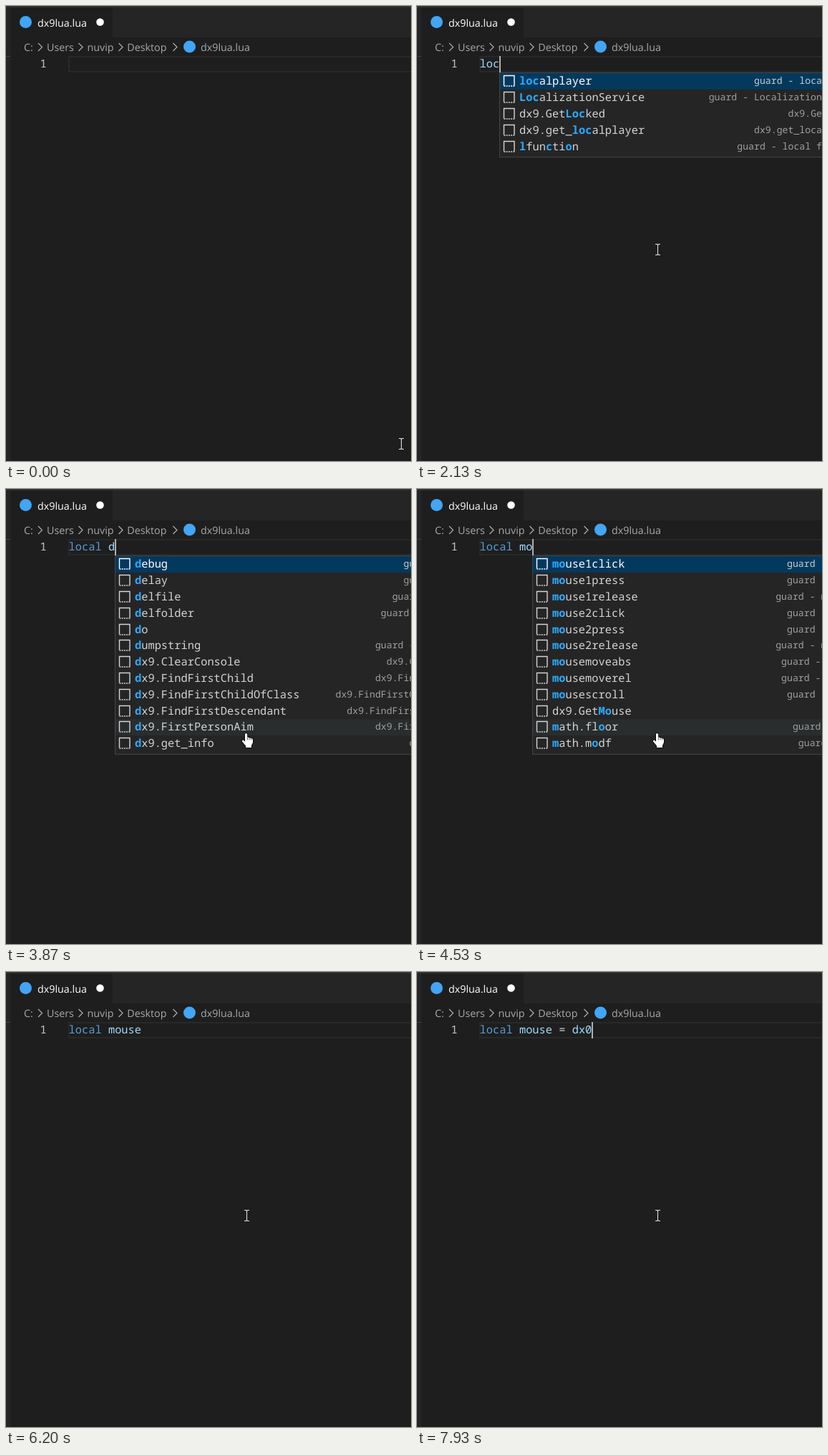
These frames come from a looping animation (566x637 px, 8 s). An HTML page with a canvas:

```html
<!DOCTYPE html>
<html lang="en">
<head>
<meta charset="utf-8">
<title>Code completion</title>
<style>
  html, body { margin: 0; width: 100%; height: 100%; overflow: hidden; background: #1e1e1e; }
  canvas { display: block; }
</style>
</head>
<body>
<canvas id="stage" width="566" height="637"></canvas>
<script>
const ctx = document.getElementById('stage').getContext('2d');
const LOOP = 8000, CHAR = 9.22, DETAIL_CHAR = 7.92, ROW = 22.82;
const MONO = '"Noto Sans Mono", "DejaVu Sans Mono", monospace';
const CODE = `500 15.37px ${MONO}`, BOLD = `bold 15.37px ${MONO}`, DETAIL = `13.2px ${MONO}`;
const UI = '14.3px "Open Sans", "Noto Sans", sans-serif';

const words = text => text.split(' ');
const dxItems = words('ClearConsole FindFirstChild FindFirstChildOfClass FindFirstDescendant FirstPersonAim ' +
  'get_info get_localplayer get_player get_players GetAdornee GetAllParts GetBoolValue').map(name => 'dx9.' + name);
const mouseItems = words('mouse1click mouse1press mouse1release mouse2click mouse2press mouse2release ' +
  'mousemoveabs mousemoverel mousescroll');
const localItems = words('localplayer LocalizationService dx9.get_localplayer');

// Brackets mark matched letters where the match is not one plain run.
const completions = {
  l: words('lfunction loadfile loadstring localplayer LocalizationService Lighting ' +
    'dx9.get_localplayer dx9.GetLocked delay delfile delfolder dx9.ClearConsole'),
  lo: words('loadfile loadstring localplayer LocalizationService dx9.GetLocked dx9.get_localplayer [l]functi[o]n'),
  loc: words('localplayer LocalizationService dx9.GetLocked dx9.get_localplayer [l]fun[c]ti[o]n'),
  loca: localItems,
  local: localItems,
  d: [...words('debug delay delfile delfolder do dumpstring'), ...dxItems.slice(0, 6)],
  dx: dxItems,
  m: ['math', ...mouseItems, 'dx9.GetMouse', 'dumpstring'],
  mo: [...mouseItems, 'dx9.GetMouse', '[m]ath.fl[o]or', '[m]ath.m[o]df'],
  mou: [...mouseItems, 'dx9.GetMouse', ':SetAttribute()', ':GetPropertyChangedSignal()'],
  moua: words('[mou]se1rele[a]se [mou]se2rele[a]se [mou]semove[a]bs'),
  mouae: words('[mou]se1rele[a]s[e] [mou]se2rele[a]s[e]')
};
completions.mous = completions.mouse =
  [...mouseItems, ':[S]etAttribute()', 'dx9.GetMouse', ':GetPropertyChanged[S]ignal()'];

// [start in ms, typed text, what shows: '' caret, 'list' caret and completions, 'off' hidden caret]
const states = [
  [0, '', 'off'], [530, '', ''], [1070, '', 'off'], [1530, '', ''],
  [1800, 'l', ''], [1865, 'l', 'list'], [1930, 'lo', ''], [2000, 'lo', 'list'], [2130, 'loc', 'list'],
  [2265, 'loca', 'list'], [2330, 'local', 'list'], [2465, 'local ', ''],
  [2800, 'local d', ''], [2865, 'local d', 'list'], [3000, 'local dx', 'list'], [3130, 'local dx0', ''],
  [3665, 'local dx', ''], [3730, 'local dx', 'list'], [3865, 'local d', 'list'], [4000, 'local ', ''],
  [4330, 'local m', 'list'], [4530, 'local mo', 'list'], [4730, 'local mou', 'list'],
  [4800, 'local mouae', 'list'], [5000, 'local mouae ', ''], [5130, 'local mouae', ''],
  [5265, 'local moua', 'list'], [5400, 'local mou', 'list'], [5465, 'local mous', 'list'],
  [5665, 'local mouse', 'list'], [5730, 'local mouse ', ''], [6200, 'local mouse ', 'off'],
  [6600, 'local mouse =', ''], [6665, 'local mouse = ', ''],
  [7130, 'local mouse = d', 'list'], [7530, 'local mouse = dx', 'list'], [7930, 'local mouse = dx0', '']
];

function rect(x, y, w, h, color) {
  ctx.fillStyle = color;
  ctx.fillRect(x, y, w, h);
}

function text(str, x, y, font, color) {
  ctx.font = font;
  ctx.fillStyle = color;
  ctx.fillText(str, x, y);
}

function disc(x, y, r, color) {
  ctx.fillStyle = color;
  ctx.beginPath();
  ctx.arc(x, y, r, 0, 7);
  ctx.fill();
}

function line(points, color, width = 1, dash = []) {
  ctx.strokeStyle = color;
  ctx.lineWidth = width;
  ctx.setLineDash(dash);
  ctx.beginPath();
  points.forEach(([x, y]) => ctx.lineTo(x, y));
  ctx.stroke();
  ctx.setLineDash([]);
}

function drawWindow() {
  rect(0, 0, 566, 637, '#1e1e1e');
  rect(0, 0, 6, 637, '#252526');
  rect(0, 70, 6, 1, '#444444');
  rect(149, 2, 417, 42, '#252526');
  rect(0, 0, 566, 2, '#333333');

  disc(27.5, 22.5, 8.5, '#42a5f5');
  text('dx9lua.lua', 44, 28.5, UI, '#ffffff');
  disc(131.5, 22.5, 5.3, '#ffffff');

  const crumbs = [['C:', 25], ['Users', 57], ['nuvip', 113.5], ['Desktop', 169.3], ['dx9lua.lua', 272]];
  crumbs.forEach(([name, x]) => text(name, x, 62.7, UI, '#a9a9a9'));
  [45, 101.5, 157.5, 233.5].forEach(x => line([[x, 52], [x + 5.5, 57.5], [x, 63]], '#a9a9a9', 1.3));
  disc(256.5, 57, 8.5, '#42a5f5');

  ctx.strokeStyle = '#282828';
  ctx.lineWidth = 2;
  ctx.strokeRect(88, 71, 500, 21);
  text('1', 47.5, 86, CODE, '#c6c6c6');
}

function drawCode(typed) {
  let column = 0;
  for (const token of typed.split(/( )/)) {
    const color = token === 'local' ? '#569cd6' : token === '=' ? '#d4d4d4' : '#9cdcfe';
    text(token, 87.6 + column * CHAR, 86, CODE, color);
    column += token.length;
  }
}

function splitMatches(item, query) {
  if (item.includes('[')) return item.split(/[\[\]]/);
  const at = item.toLowerCase().indexOf(query);
  if (at < 0) return [item];
  const end = at + query.length;
  return [item.slice(0, at), item.slice(at, end), item.slice(end)];
}

function drawItem(item, query, left, top, selected) {
  const labelX = left + 28, iconX = left + 6.5, iconY = top + 3.5;
  const color = selected ? '#ffffff' : '#d4d4d4';
  line([[iconX, iconY + 14], [iconX, iconY], [iconX + 14.5, iconY], [iconX + 14.5, iconY + 14]], color, 1.4);
  line([[iconX, iconY + 14.5], [iconX + 15, iconY + 14.5]], color, 1.4, [2, 1.2]);

  let column = 0;
  splitMatches(item, query).forEach((part, i) => {
    text(part, labelX + column * CHAR, top + 16, i % 2 ? BOLD : CODE, i % 2 ? '#2aaaff' : color);
    column += part.length;
  });

  const name = item.replace(/[\[\]:]/g, '');
  const detail = name.startsWith('dx9.') ? name : 'guard - ' + (name === 'lfunction' ? 'local function' : name);
  const detailX = Math.max(left + 506.5 - detail.length * DETAIL_CHAR, labelX + column * CHAR + 16.5);
  text(detail, detailX, top + 15, DETAIL, selected ? '#c5ccd2' : '#9f9f9f');
}

function drawCompletions(items, query, left) {
  const height = items.length * ROW + 5;
  rect(left, 93, 600, height, '#454545');
  rect(left + 1, 94, 600, height - 2, '#252526');
  rect(left + 1, 94, 600, ROW, '#04395e');
  if (items.length === 12) rect(left + 1, 94 + 10 * ROW, 600, ROW, '#2a2d2e');
  items.forEach((item, i) => drawItem(item, query, left, Math.round(94.25 + i * ROW), i === 0));
}

function drawBeam(x, y) {
  const strokes = [
    [[x, y - 7], [x, y + 7]],
    [[x - 3.5, y - 7.5], [x - 1, y - 7.5], [x, y - 6.5], [x + 1, y - 7.5], [x + 3.5, y - 7.5]],
    [[x - 3.5, y + 7.5], [x - 1, y + 7.5], [x, y + 6.5], [x + 1, y + 7.5], [x + 3.5, y + 7.5]]
  ];
  strokes.forEach(points => line(points, '#e0e0e0', 1.1));
}

const handShape = new Path2D('M5 2Q6.5 0 8.2 2V6.5L14.5 8Q16 8.6 16 10.5V14L14 18V21H6V18.5L1 12.5Q.5 10 2.8 10.5L5 12.8Z');

function drawHand(x, y) {
  ctx.save();
  ctx.translate(x, y);
  ctx.strokeStyle = '#000000';
  ctx.lineWidth = 1.6;
  ctx.stroke(handShape);
  ctx.fillStyle = '#ffffff';
  ctx.fill(handShape);
  [8.4, 11, 13.6].forEach(knuckle => line([[knuckle, 7], [knuckle, 10.5]], '#333333', 0.8));
  ctx.restore();
}

function drawPointer(t, overList) {
  if (overList) return drawHand(329, 341);
  const p = Math.min(1, Math.floor((t + 4) / 66.67) / 5);
  const ease = p * p * (3 - 2 * p);
  drawBeam(Math.round(552 - 216 * ease) + 0.5, Math.round(613 - 272 * ease));
}

function draw(now) {
  const t = now % LOOP;
  const [, typed, shown] = states.findLast(([start]) => start <= t);
  const caretX = Math.floor(87.6 + typed.length * CHAR);
  const query = typed.split(' ').pop();
  const items = shown === 'list' ? completions[query] : [];

  ctx.textRendering = 'geometricPrecision';
  drawWindow();
  drawCode(typed);
  if (shown !== 'off') rect(caretX, 70, 2, 23, '#aeafad');
  if (items.length) drawCompletions(items, query, caretX);
  drawPointer(t, items.length === 12);
}

const begin = performance.now();
function tick() {
  draw(performance.now() - begin);
  requestAnimationFrame(tick);
}
tick();
</script>
</body>
</html>
```
